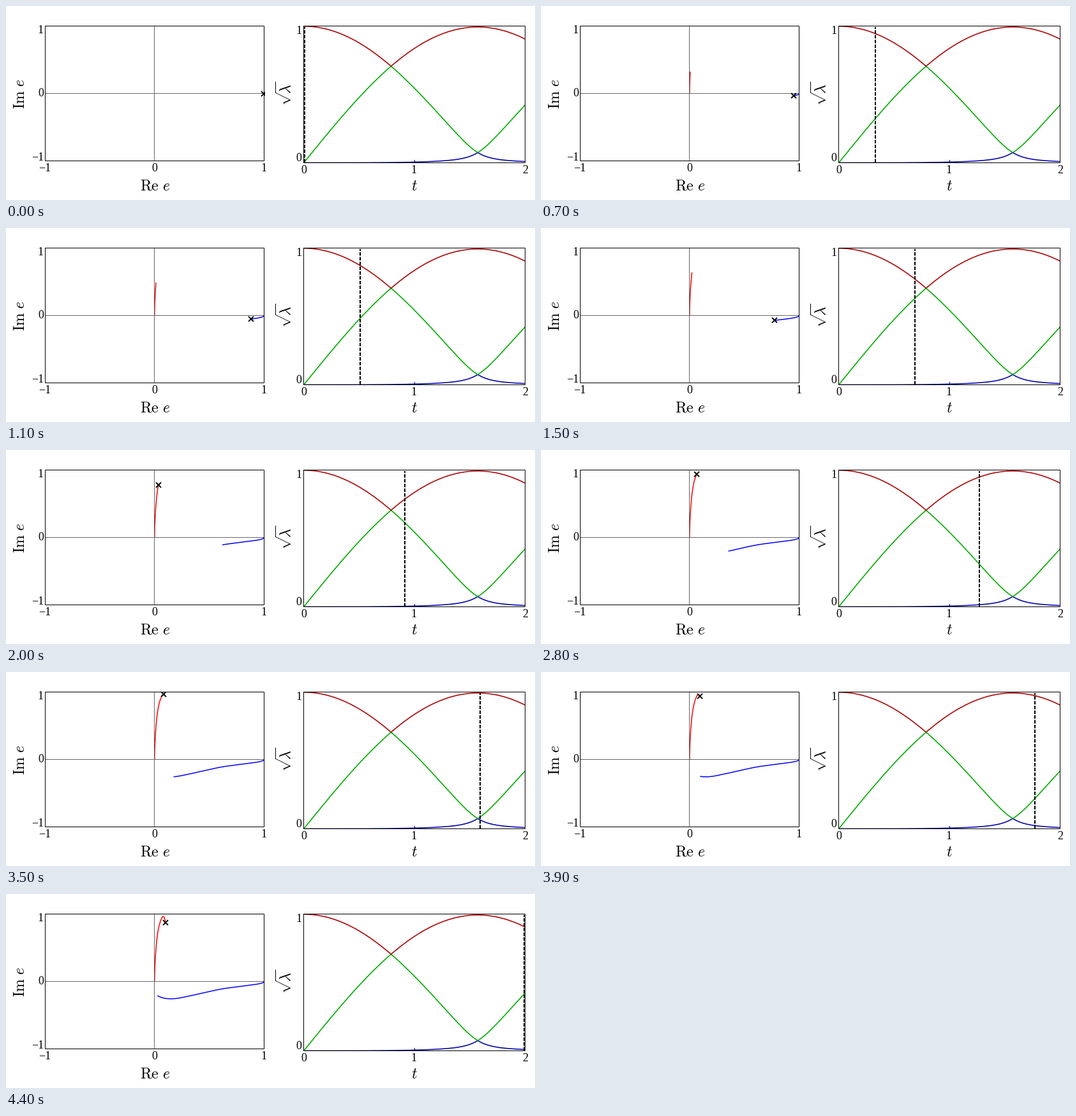
Recreate the animation shown at these times as a matplotlib script. Size 829 by 305 pixels, loop 4.5 s.

```python
import numpy as np
import matplotlib.pyplot as plt
from matplotlib.animation import FuncAnimation
from matplotlib.patches import Rectangle

W, H, DPI = 829, 305, 72          # at 72 dpi one point is one pixel
FRAMES, INTERVAL = 45, 100

plt.rcParams["mathtext.fontset"] = "cm"
fig = plt.figure(figsize=((W + 1e-3) / DPI, (H + 1e-3) / DPI), dpi=DPI, facecolor="white")
ax = fig.add_axes([0, 0, 1, 1])
# Integers fall on pixel centres; the small x offset keeps snapping unambiguous
ax.set(xlim=(-0.4, W - 0.4), ylim=(H - 0.5, -0.5))
ax.axis("off")


def panel(x0, y0, x1, y1):
    """Draw a frame and return a slightly larger clip box."""
    ax.add_patch(Rectangle((x0, y0), x1 - x0, y1 - y0, fill=False, lw=1, ec="black", zorder=6))
    clip = Rectangle((x0 - 0.5, y0 - 0.5), x1 - x0 + 1, y1 - y0 + 1, fc="none", ec="none")
    return ax.add_patch(clip)


def line(x, y, color, clip, lw=1.5, **kw):
    artist, = ax.plot(x, y, color=color, lw=lw, **kw)
    artist.set_clip_path(clip)
    return artist


def tick(x, y, s, ha="center"):
    ax.text(x, y, s, ha=ha, va="baseline", family="Liberation Serif", size=18)


def label(x, y, s, va="baseline", rotation=0):
    ax.text(x, y, s, ha="center", va=va, rotation=rotation, size=24)


def hermite(t, knots, values):
    """Smooth curve through a few points."""
    slope = np.gradient(values, knots, edge_order=2)
    i = np.clip(np.searchsorted(knots, t, side="right") - 1, 0, len(knots) - 2)
    h = knots[i + 1] - knots[i]
    u = (t - knots[i]) / h
    return ((1 + 2 * u) * (1 - u) ** 2 * values[i] + u * (1 - u) ** 2 * h * slope[i]
            + u * u * (3 - 2 * u) * values[i + 1] + u * u * (u - 1) * h * slope[i + 1])


# Left panel: complex plane
left = panel(61, 31, 404, 243)
line([61, 404], [137, 137], "#666666", left, lw=1, zorder=4.5)
line([232, 232], [31, 243], "#666666", left, lw=1, zorder=4.5)
for y, s in ((42, "1"), (141, "0"), (242, "\u22121")):
    tick(58.5, y, s, "right")
for x, s in ((60.5, "\u22121"), (232, "0"), (404, "1")):
    tick(x, 259, s)
label(233.5, 289, r"$\mathrm{Re}\ e$")
label(22, 138, r"$\mathrm{Im}\ e$", "center", 90)

steps = np.arange(1, 200) / 100
knots = np.array([0.01, 0.33, 0.69, 0.91, 1.27, 1.59, 1.99])
blue_xy = np.array([(403.6, 137.5), (395.4, 140.8), (366, 144.8), (339.4, 148.5),
                    (294, 158.3), (263, 164.1), (237.5, 159.6)])
red_xy = np.array([(232.4, 136.5), (233.4, 103.5), (236.1, 70), (238.4, 54.5),
                   (243.4, 38), (246.7, 35), (249.4, 44.8)])
blue_path = np.array([hermite(steps, knots, v) for v in blue_xy.T])
red_path = np.array([hermite(steps, knots, v) for v in red_xy.T])

blue_trail = line([], [], "#0000ff", left, zorder=4)
red_trail = line([], [], "#ff0000", left, zorder=4)
cross = line([], [], "black", left, lw=0, marker="x", ms=7.2, mew=1.9, zorder=5)

# Right panel: square roots of the eigenvalues
right = panel(466, 31, 813, 246)
line([640, 640], [242, 246], "black", right, lw=1)
for y, s in ((43, "1"), (243, "0")):
    tick(463, y, s, "right")
for x, s in ((466, "0"), (639, "1"), (813, "2")):
    tick(x, 262, s)
label(640, 289, r"$t$")
label(436.5, 137, r"$\sqrt{\!\lambda}$", "center", 90)


def px(t):
    return 466.2 + 173.6 * t


def py(v):
    return 246 - 214.7 * v


t = np.linspace(0, 2, 801)
c, s = np.cos(t), np.sin(t)
gap = 0.075 * s ** 2
root = np.sqrt(c ** 2 + 4 * gap ** 2)
falling, rising = (root + c) / 2, (root - c) / 2
main = np.sqrt(np.maximum(0, s ** 2 - 2 * gap ** 2))
ranked = np.sort([falling, rising, main], axis=0)
for v, color in zip(ranked, ("#0000aa", "#00aa00", "#aa0000")):
    line(px(t), py(v), color, right, lw=1.6, zorder=4)

cursor = line([], [], "black", right, lw=2, ls=(0, (2.75, 1)), dash_capstyle="butt", zorder=5)


def update(k):
    n = 1 + (9 * k + 1) // 2
    blue_trail.set_data(*blue_path[:, :n])
    red_trail.set_data(*red_path[:, :n])
    now = n / 100
    head = blue_path if now < np.pi / 4 else red_path
    cross.set_data(head[:1, n - 1], head[1:, n - 1])
    cursor.set_data([px(now)] * 2, [246, 33])
    return blue_trail, red_trail, cross, cursor


anim = FuncAnimation(fig, update, frames=FRAMES, interval=INTERVAL, repeat=True, repeat_delay=0)
plt.show()
```
